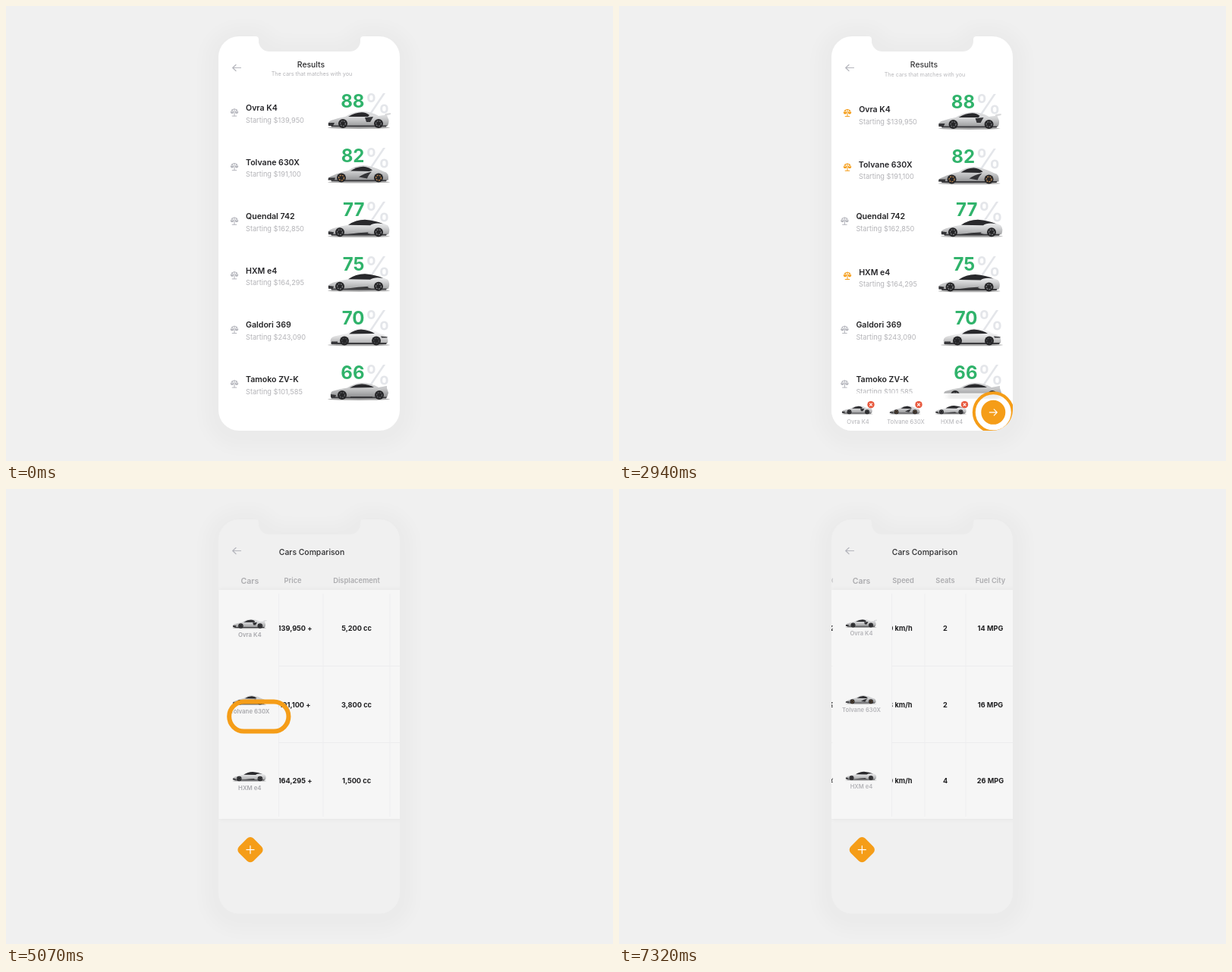
Animation, 800 px wide and 600 px high, one loop 8 s. Source, as an HTML page:

```html
<!DOCTYPE html>
<html lang="en">
<head>
<meta charset="utf-8">
<title>Car comparison</title>
<style>
  html, body { margin: 0; width: 100%; height: 100%; overflow: hidden; background: #f0f0f0; }
  svg { display: block; width: 800px; height: 600px; font-family: Inter, Roboto, sans-serif; }
  .mid { text-anchor: middle; }
  .title { font-size: 10.4px; font-weight: 500; fill: #2c2c2e; }
  .name { font-weight: 600; }
  .price { font-size: 9.2px; fill: #b4b4b8; }
  .score { font-size: 24px; font-weight: 700; fill: #30b36b; text-anchor: end; }
  .percent { font-size: 35px; font-weight: 500; fill: #e4e6ea; }
  .small { font-size: 7.6px; fill: #b2b2b6; }
  .head { font-size: 9.3px; font-weight: 600; fill: #acacaf; }
  .value { font-size: 9.2px; font-weight: 700; fill: #1f1f21; }
  .line { fill: none; stroke-width: 1.2; stroke-linecap: round; stroke-linejoin: round; }
</style>
</head>
<body>
<svg id="stage" viewBox="0 0 800 600">
  <defs>
    <path id="shell" d="M307 40H329Q333 40 333 44V46A14 14 0 0 0 347 60H453A14 14 0 0 0 467 46V44Q467 40 471 40H492A27 27 0 0 1 519 67V533A27 27 0 0 1 492 560H307A27 27 0 0 1 280 533V67A27 27 0 0 1 307 40Z"/>
    <clipPath id="screen"><use href="#shell"/></clipPath>
    <clipPath id="cellArea"><path d="M280 100h1.5v340h-1.5zM359 100h160v340h-160z"/></clipPath>
    <filter id="soft" x="-40%" y="-20%" width="180%" height="140%"><feGaussianBlur stdDeviation="11"/></filter>
    <filter id="glow" x="-10%" y="-20%" width="120%" height="140%"><feGaussianBlur stdDeviation="3"/></filter>
    <linearGradient id="shade" x2="0" y2="1">
      <stop offset=".35" stop-color="#fff" stop-opacity=".25"/>
      <stop offset="1" stop-color="#222" stop-opacity=".3"/>
    </linearGradient>
    <g id="scales">
      <path class="line" style="stroke-width:1" d="M-4.5-.5L-3-3.5Q0-5.5 3-3.5L4.5-.5M0-4.5V4.5M-2.8 4.8H2.8M-3-3.5L-1.5-.5M3-3.5L1.5-.5"/>
      <path stroke="none" d="M-5.3-.8h4.6Q-1 1.8-3 1.8-5 1.8-5.3-.8ZM.7-.8h4.6Q5 1.8 3 1.8 1 1.8.7-.8Z"/>
    </g>
  </defs>
  <use href="#shell" y="5" stroke="#000" stroke-width="36" opacity=".018" filter="url(#soft)"/>
  <use href="#shell" id="body"/>
  <g id="app" clip-path="url(#screen)"></g>
</svg>
<script>
const LOOP = 8000, ORANGE = '#f59d18', GREY = '#b5b6bd';
const $ = id => document.getElementById(id);

const clamp = x => Math.max(0, Math.min(1, x));
const span = (t, a, b) => clamp((t - a) / (b - a));
const mix = (a, b, k) => a + (b - a) * k;
const ease = k => k < .5 ? 4 * k ** 3 : 1 - 4 * (1 - k) ** 3;
const out = k => 1 - (1 - k) ** 3;
const back = k => k <= 0 ? 0 : 1 + 2.7 * (k - 1) ** 3 + 1.7 * (k - 1) ** 2;

function set(node, attrs) {
  for (const key in attrs) node.setAttribute(key, attrs[key]);
  return node;
}
function add(parent, tag, attrs = {}, content) {
  const node = set(document.createElementNS('http://www.w3.org/2000/svg', tag), attrs);
  if (content !== undefined) node.textContent = content;
  return parent.appendChild(node);
}
const group = (parent, attrs) => add(parent, 'g', attrs);
const label = (parent, cls, x, y, text) => add(parent, 'text', { class: cls, x, y }, text);
const place = (node, x, y, scale = 1, opacity = 1) =>
  set(node, { transform: `translate(${x} ${y}) scale(${scale})`, opacity });

// Simple side views, nose to the left, centred on 0,0
const cars = {
  wing: { paint: '#cdced0', wheels: [-21, 26], rim: '#6b6c70',
    body: 'M-40 8Q-42 4-37 1-29-2-18-4-8-10.5 4-11 17-10.5 26-5L34-6 35-8 42-9 42-7 37-6 38-3Q41 2 38 8Z',
    glass: 'M-14-4Q-5-9.5 4-9.7 10-9.5 14-6L12-4Z', trim: 'M8-3L19-4 15 3 10 3ZM-40 4L-32 4-34 8H-40Z' },
  scoop: { paint: '#c3c4c6', wheels: [-23, 26], rim: '#b9834d',
    body: 'M-41 8Q-41 4-34 2-26-2-14-4.5-5-11 6-11.5 20-10 33-3 40-2 39 8Z',
    glass: 'M-11-4Q-3-9.5 6-9.8 13-9 18-5L14-3.5Z', trim: 'M0 4Q7-1 17-3 12 2 11 6ZM-40 5L-31 5-32 8H-40Z' },
  swoop: { paint: '#dadbdd', wheels: [-25, 26], rim: '#77787c',
    body: 'M-40 8Q-43 3-34 0-25-3-14-4.5-4-11.5 8-11.5 24-10 38-4 42 1 39 8Z',
    glass: 'M-14-4.5Q-4-11.5 8-11.5 22-10.5 32-6 20-8 15-4Z', trim: 'M-17 8Q0 5.5 14 5 8 6 17 8ZM-40 4L-33 5-34 8H-40Z' },
  round: { paint: '#eeeeef', wheels: [-19, 23], rim: '#444549',
    body: 'M-37 8Q-39 1-32-1-24-3-16-4.5-8-11 3-11.5 18-11 29-4 40-3 38 8Z',
    glass: 'M-13-4Q-6-9.7 3-10 15-9 21-4.5Z', trim: 'M-36 6H-28V8H-36ZM29-1L38 0 37 1 30 1Z' },
  square: { paint: '#b9babc', wheels: [-22, 27], rim: '#5b5c60',
    body: 'M-37 8Q-38 2-35 0-26-3-15-4.5-6-10.5 4-11 17-10.5 26-5L37-7 37-4 39 2 37 8Z',
    glass: 'M-12-4.5Q-4-9.3 4-9.5 14-9 20-5Z', trim: 'M-37 4L-30 5-31 8H-37ZM-11 7H18V8H-11Z' }
};
for (const id in cars) {
  const { paint, wheels, rim, body, glass, trim } = cars[id];
  const g = group(document.querySelector('defs'), { id });
  add(g, 'ellipse', { cy: 10.6, rx: 41, ry: 1.3, fill: '#555', opacity: .5 });
  add(g, 'path', { d: body, fill: paint });
  add(g, 'path', { d: body, fill: 'url(#shade)' });
  add(g, 'path', { d: 'M-37 7.6H37L36 9.6H-36Z', fill: '#3b3b3e' });
  add(g, 'path', { d: glass, fill: '#29292c' });
  add(g, 'path', { d: trim, fill: '#343437' });
  wheels.forEach(cx => {
    add(g, 'circle', { cx, cy: 5, r: 6, fill: '#252527' });
    add(g, 'circle', { cx, cy: 5, r: 3.4, fill: 'none', stroke: rim, 'stroke-width': 1.4, 'stroke-dasharray': '2 1.3' });
  });
}

const rows = [
  { name: 'Ovra K4', price: '$139,950', score: 88, car: 'wing', slot: 0, tap: 240, drop: 870, trayX: 315,
    values: ['5,200 cc', '3.2 Sec', '330 km/h', '2', '14 MPG'] },
  { name: 'Tolvane 630X', price: '$191,100', score: 82, car: 'scoop', slot: 1, tap: 930, drop: 1240, trayX: 378,
    values: ['3,800 cc', '2.9 Sec', '328 km/h', '2', '16 MPG'] },
  { name: 'Quendal 742', price: '$162,850', score: 77, car: 'swoop' },
  { name: 'HXM e4', price: '$164,295', score: 75, car: 'swoop', slot: 2, tap: 1290, drop: 1600, trayX: 438.5,
    values: ['1,500 cc', '4.4 Sec', '250 km/h', '4', '26 MPG'] },
  { name: 'Galdori 369', price: '$243,090', score: 70, car: 'round' },
  { name: 'Tamoko ZV-K', price: '$101,585', score: 66, car: 'square' }
];
const picked = rows.filter(r => r.values);
const columns = [
  ['Price', 0], ['Displacement', 84], ['0-100 kmph', 170.5], ['Top Speed', 249], ['Seats', 314], ['Fuel City', 373.5]
];

const app = $('app');
add(app, 'path', { class: 'line', stroke: GREY, d: 'M309.5 81.5H299M303 77.5L298.7 81.5 303 85.5' });
const results = label(app, 'title mid', 402, 80.5, 'Results');
const subtitle = label(app, 'small mid', 403, 92, 'The cars that matches with you');
subtitle.style.fontSize = '7.2px';
const compareTitle = label(app, 'title mid', 403, 87, 'Cars Comparison');

// Comparison table
const table = group(app);
const panelShade = add(table, 'rect', { y: 133, height: 302, width: 420, opacity: .055, filter: 'url(#glow)' });
const panel = add(table, 'rect', { y: 133, height: 302, width: 420, fill: '#f6f6f6' });
const cells = group(group(table, { 'clip-path': 'url(#cellArea)' }));
[233.5, 334.5].forEach(y => add(cells, 'path', { d: `M-33 ${y}H470`, stroke: '#ececee' }));
[40, 128, 211, 287, 341].forEach(x => add(cells, 'path', { d: `M${x} 138V432`, stroke: '#eeeef0' }));
columns.forEach(([title, x], c) => {
  label(cells, 'head mid', x, 124, title);
  picked.forEach((r, k) => label(cells, 'value mid', x, 187 + 100.6 * k, c ? r.values[c - 1] : r.price + ' +'));
});
const edge = add(table, 'path', { d: 'M359.5 138V432', stroke: '#eeeef0' });
const carsHead = label(table, 'head mid', 0, 124.5, 'Cars');
carsHead.style.fontSize = '10.5px';

// Result list
rows.forEach(r => {
  r.icon = group(app);
  r.disc = add(r.icon, 'circle', { fill: ORANGE });
  r.glyph = add(r.icon, 'use', { href: '#scales' });
  r.ring = add(r.icon, 'circle', { fill: 'none', stroke: ORANGE });
  r.title = label(app, 'name mid', 0, 0, r.name);
  r.title.style.fontSize = '10.6px';
  r.half = r.title.getComputedTextLength() / 2;
  r.sub = label(app, 'price', 0, 0, 'Starting ' + r.price);
  r.picture = group(app);
  r.rate = group(r.picture);
  label(r.rate, 'percent mid', 25, -9, '%');
  label(r.rate, 'score', 7.5, -16, r.score);
  add(r.picture, 'use', { href: '#' + r.car });
});

// Tray with the chosen cars
const tray = group(app);
const trayBack = add(tray, 'rect', { x: 280, width: 239, height: 60 });
const trayHaze = add(tray, 'rect', { x: 433, y: 511, width: 70, height: 4, fill: '#777', filter: 'url(#glow)' });
picked.forEach(r => {
  r.mini = add(tray, 'use', { href: '#' + r.car });
  r.tag = label(tray, 'small mid', r.trayX, 549.3, r.name);
  r.badge = group(tray);
  add(r.badge, 'circle', { r: 4.7, fill: '#e85a3f' });
  add(r.badge, 'path', { d: 'M-1.5-1.5L1.5 1.5M1.5-1.5L-1.5 1.5', class: 'line', stroke: '#fff' });
});

function button(iconPath) {
  const g = group(app);
  const shape = add(g, 'rect', { fill: ORANGE, transform: 'rotate(45)' });
  const icon = add(g, 'path', { class: 'line', stroke: '#fff', d: iconPath });
  return { g, icon, shape };
}
const size = (shape, side, rx) => set(shape, { x: -side / 2, y: -side / 2, width: side, height: side, rx });
const next = button('M-5 0H5M1-4L5 0 1 4');
const nextRing = add(app, 'circle', { cx: 493.3, fill: 'none', stroke: ORANGE, 'stroke-width': 4 });
const plus = button('M-5 0H5M0-5V5');
size(plus.shape, 27, 6);
const finger = add(app, 'rect', { fill: 'none', stroke: ORANGE, 'stroke-width': 6 });

function drawRow(r, i, t, move, shrink) {
  const y = 71.6 * i, chosen = !!r.values;
  const fade = 1 - clamp((move - .05) * 2.5);
  const since = chosen ? t - r.tap : -1;
  const tint = since < 40 ? GREY : since < 220 ? '#fff' : ORANGE;
  place(r.icon, chosen ? 301 : mix(301, 171, move), 140.3 + y + (chosen ? 20 * move : 0), 1, fade);
  set(r.glyph, { fill: tint, stroke: tint });
  set(r.disc, { r: 8 * span(since, 0, 90), opacity: 1 - span(since, 150, 270) });
  const burst = span(since, 110, 400);
  set(r.ring, { r: mix(8, 15, out(burst)), 'stroke-width': mix(3, .6, burst), opacity: burst && 1 - burst ** 3 });

  const startX = 316 + r.half, startY = 138 + y;
  if (!chosen) {
    const dx = -130 * move;
    set(r.title, { x: startX + dx, y: startY, fill: '#232325', opacity: fade });
    set(r.sub, { x: 316 + dx, y: 153.5 + y, opacity: fade });
    place(r.picture, 465, 150 + y, 1, fade);
    return;
  }
  const nameY = mix(startY, 219 + 100 * r.slot, move);
  const shade = Math.round(mix(35, 180, shrink));
  set(r.title, {
    x: mix(mix(startX, 342, move), 319.5, shrink),
    y: mix(nameY, 193.3 + 101 * r.slot, shrink),
    fill: `rgb(${shade},${shade},${shade + 4})`
  });
  r.title.style.fontSize = mix(10.6, 7.6, shrink) + 'px';
  set(r.sub, { x: 316, y: nameY + 15.5, opacity: fade });
  place(r.picture, mix(mix(465, 341, move), 319, shrink),
    mix(mix(150 + y, 187 + 99.6 * r.slot, move), 177 + 100.8 * r.slot, shrink), mix(1, .5, shrink));
  set(r.rate, { opacity: 1 - clamp(shrink * 1.1) });
}

function drawTray(t, move, fill) {
  const sink = 60 * move, left = 1 - clamp((move - .05) * 2);
  const rise = out(span(t, 700, 1250));
  set(tray, { transform: `translate(0 ${sink})` });
  set(trayBack, { y: mix(562, 509, rise), fill, opacity: left });
  set(trayHaze, { opacity: .3 * rise * left });
  picked.forEach(r => {
    const fall = ease(span(t, r.drop, r.drop + 300));
    place(r.mini, r.trayX - 1, mix(489, 531, fall), .5, span(t, r.drop, r.drop + 110) * left);
    set(r.tag, { opacity: span(t, r.drop + 260, r.drop + 460) * left });
    place(r.badge, r.trayX + 17, 524, back(span(t, r.drop + 260, r.drop + 500)), left);
  });
  const round = ease(span(t, 2600, 2780));
  const cy = 534.5 + sink * .8;
  place(next.g, 493.3, cy, back(span(t, 690, 1000)) * (1 - clamp((move - .05) * 1.4)));
  size(next.shape, mix(29, 32, round), mix(7, 16, round));
  const press = span(t, 2640, 2910);
  set(nextRing, { cy, r: mix(14, 25.5, out(press)), opacity: press && 1 - span(t, 2970, 3120) });
}

function drawFinger(t, from, to, x, width, height) {
  const show = out(span(t, from, from + 140));
  const w = width * show, h = height * show;
  set(finger, {
    x: x - w / 2 + 3, y: 300 - h / 2 + 3, width: Math.max(0, w - 6), height: Math.max(0, h - 6),
    rx: Math.max(0, h / 2 - 3), opacity: show * (1 - span(t, to - 170, to))
  });
}

function draw(t) {
  const move = ease(span(t, 2840, 3370));
  const drag1 = span(t, 4620, 5240), shrink = ease(drag1);
  const drag2 = span(t, 5610, 7320), scroll = ease(drag2 ** .9);
  const tone = Math.round(mix(255, 240, move));
  const fill = `rgb(${tone},${tone},${tone})`;
  set($('body'), { fill });
  set(results, { opacity: 1 - clamp(move * 2), y: 80.5 + 6 * move });
  set(subtitle, { opacity: 1 - clamp(move * 2.5), y: 92 + 30 * move });
  set(compareTitle, { opacity: span(t, 3170, 3470) });

  const arrive = span(t, 3150, 3870);
  const priceX = mix(mix(435 + 130 * (1 - arrive) ** 6, 373, shrink), 116, scroll);
  const panelX = mix(priceX - 47, 280, clamp(shrink * 1.08));
  set(table, { opacity: span(t, 3150, 3420) });
  set(panel, { x: panelX });
  set(panelShade, { x: panelX });
  set(cells, { transform: `translate(${priceX} 0)` });
  set(edge, { opacity: shrink });
  set(carsHead, { x: mix(342, 319.5, shrink) });

  rows.forEach((r, i) => drawRow(r, i, t, move, shrink));
  drawTray(t, move, fill);
  place(plus.g, mix(341, 320.3, shrink), 475.7, back(span(t, 3405, 3750)));
  set(plus.icon, { opacity: span(t, 3470, 3600) });

  if (t < 5500) {
    drawFinger(t, 4560, 5310, mix(450, 323, shrink), 45 + 52 * Math.sin(Math.PI * drag1), 45);
  } else {
    const pull = Math.sin(Math.PI * drag2);
    drawFinger(t, 5610, 7250, mix(490, 316, scroll), 45 + 48 * pull, 45 - 3 * pull);
  }
}

const start = performance.now();
function tick() {
  draw((performance.now() - start) % LOOP);
  requestAnimationFrame(tick);
}
tick();
</script>
</body>
</html>
```
